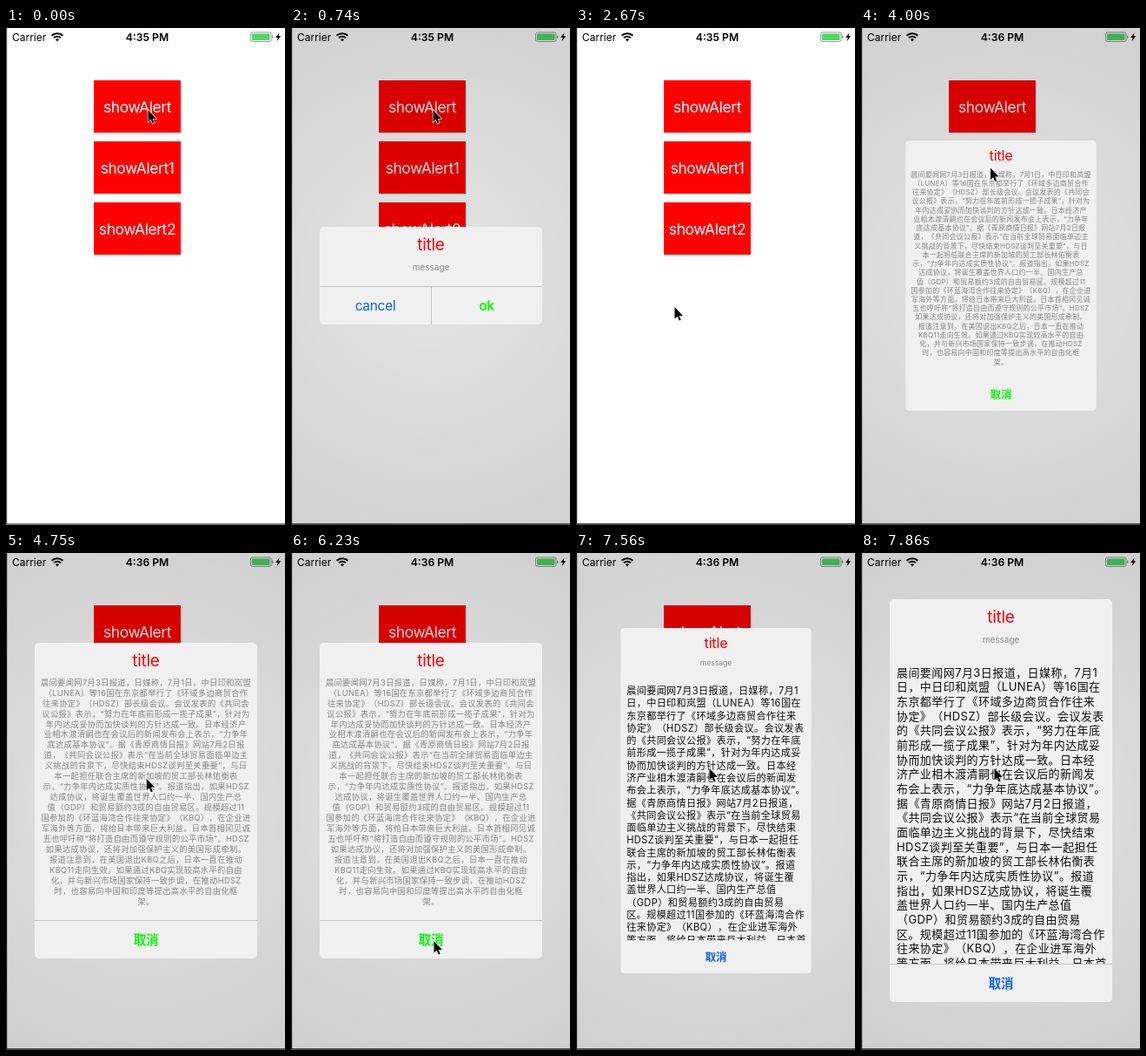
Animation of 321 by 570 pixels, one loop 8000 ms. Source, as an HTML page:

```html
<!DOCTYPE html>
<html lang="zh-CN">
<head>
<meta charset="utf-8">
<title>Alerts</title>
<style>
  html, body { margin: 0; width: 100%; height: 100%; overflow: hidden; background: #fff; }
  svg { display: block; width: 100%; height: 100%; }
  text { font-family: Inter, "Noto Sans CJK SC", "Noto Sans CJK", sans-serif; white-space: pre; }
  .mid { text-anchor: middle; }
  .btn { font-size: 17.5px; letter-spacing: -.025em; fill: #fff; }
  .title { font-size: 19px; letter-spacing: -.015em; fill: #f00; }
  .note { font-size: 10px; fill: #888; }
  .small, .large { letter-spacing: .033em; text-spacing-trim: space-all; font-feature-settings: "chws" 0; }
  .small { font-size: 9.3px; fill: #858585; }
  .large { font-size: 13px; fill: #111; }
  .act { font-size: 15.5px; letter-spacing: -.02em; }
  .zh { font-size: 14.5px; letter-spacing: -.02em; }
  .act, .zh { fill: #0a60ff; }
  .bold { font-weight: 600; }
  .ok { fill: #0f0; }
  .line { stroke: #c4c4c4; stroke-width: 1; }
</style>
</head>
<body>
<svg viewBox="0 0 321 570" preserveAspectRatio="none">
  <defs>
    <radialGradient id="shade" gradientUnits="userSpaceOnUse" cx="161" cy="284" r="320">
      <stop offset="0" stop-opacity=".11"/>
      <stop offset="1" stop-opacity=".188"/>
    </radialGradient>
    <clipPath id="scroll"><rect x="33" y="126" width="256" height="345"/></clipPath>
  </defs>
  <rect width="321" height="570" fill="#fff"/>
  <g id="buttons"></g>
  <g id="battery">
    <rect x="281.5" y="5" width="23.5" height="10.5" rx="2" fill="none" stroke="#999"/>
    <rect x="283" y="6.5" width="20.5" height="7.5" rx=".8" fill="#4cd964"/>
    <path d="M306 8.3q1.6 .3 1.6 2t-1.6 2z" fill="#999"/>
  </g>
  <rect id="dim" x="1" width="320" height="568" fill="url(#shade)"/>
  <g id="status">
    <text x="7" y="14.5" font-size="12">Carrier</text>
    <g fill="none" stroke="#000" stroke-width="2">
      <path d="M52.6 8.8a9 9 0 0 1 12.8 0"/>
      <path d="M55 11.4a5.6 5.6 0 0 1 8 0"/>
      <path d="M59 15.4l-2-2.2a2.9 2.9 0 0 1 4 0z" fill="#000" stroke="none"/>
    </g>
    <text id="clock" class="mid bold" x="162.5" y="14.5" font-size="12.2"></text>
    <path d="M314.6 5.2l-4.4 5.7h2.6l-1.2 4.3 4.6-5.9h-2.7z"/>
  </g>
  <g id="alerts"></g>
  <path id="frame" d="M.5 0V569H321" fill="none"/>
  <path id="cursor" d="M0 0V15L3.4 11.9 5.8 17.3 8 16.3 5.7 11H10.5Z" fill="#000" stroke="#fff" stroke-width="1.4" paint-order="stroke"/>
</svg>
<script>
const LOOP = 8000, STEP = 148, CX = 161, CY = 284;
const $ = id => document.getElementById(id);

// "/" breaks lines in the small layout, "|" in the large one
const story = '晨间要闻网7月3日报道，日媒称，7月1|日，中日印和岚盟/（LUNEA）等16国在|东京都举行了《环域多边商贸合作/往来|协定》（HDSZ）部长级会议。会议发表|的《共同会/议公报》表示，“努力在年底|前形成一揽子成果”，针对为/年内达成妥|协而加快谈判的方针达成一致。日本经|济产/业相木渡清嗣也在会议后的新闻发|布会上表示，“力争年/底达成基本协议”。|据《青原商情日报》网站7月2日报/道，|《共同会议公报》表示“在当前全球贸易|面临单边主/义挑战的背景下，尽快结束|HDSZ谈判至关重要”，与日/本一起担任|联合主席的新加坡的贸工部长林佑衡表|/示，“力争年内达成实质性协议”。报道|指出，如果HDSZ/达成协议，将诞生覆|盖世界人口约一半、国内生产总/值|（GDP）和贸易额约3成的自由贸易|区。规模超过11/国参加的《环蓝海湾合作|往来协定》（KBQ），在企业进/军海外|等方面，将给日本带来巨大利益。日本首|相冈见诚/五也呼吁称“将打造自由而遵守规则的公平市场”。HDSZ/如果达成协议，还将对加强保护主义的美国形成牵制。/报道注意到，在美国退出KBQ之后，日本一直在推动/KBQ11走向生效。如果通过KBQ实现较高水平的自由/化，并与新兴市场国家保持一致步调，在推动HDSZ/时，也容易向中国和印度等提出高水平的自由化框/架。';
const small = story.replace(/\|/g, '').split('/');
const large = story.replace(/\//g, '').split('|').slice(0, 21);

const text = (s, x, y, cls) => `<text x="${x}" y="${y}" class="${cls}">${s}</text>`;
const mid = (s, x, y, cls) => text(s, x, y, 'mid ' + cls);
const lines = (list, x, y, gap, cls) => list.map((s, i) => text(s, x, y + i * gap, cls)).join('');
const rule = d => `<path class="line" d="${d}"/>`;
const panel = (y, h, body) =>
  `<g><rect x="33" y="${y}" width="256" height="${h}" rx="5" fill="#f0f0f0"/>${mid('title', CX, y + 27, 'title')}${body}</g>`;

$('buttons').innerHTML = ['', 1, 2].map((n, i) =>
  `<rect x="101" y="${60 + i * 70}" width="100" height="60" fill="#f00"/>` +
  mid('showAlert' + n, 151, 96.5 + i * 70, 'btn')).join('');

$('alerts').innerHTML =
  panel(228, 112, mid('message', CX, 278, 'note') +
    rule('M33 296.5H289M161.5 296.5V340') +
    mid('cancel', 97, 323.5, 'act') + mid('ok', 225, 323.5, 'act bold ok')) +
  panel(103, 362, lines(small, CX, 151.7, 11.95, 'mid small') +
    rule('M33 421.5H289') + mid('取消', CX, 448.5, 'zh bold ok')) +
  panel(53, 462, mid('message', CX, 103, 'note') +
    `<g clip-path="url(#scroll)">${lines(large, 41, 141.8, 16.65, 'large')}</g>` +
    rule('M33 471.5H289') + mid('取消', CX, 498.5, 'zh bold'));
const panels = [...$('alerts').children];

// start and end step; opening values are [opacity, scale]
const shows = [
  { from: 3, to: 16, open: [[.35, .75], [.8, .92], [.95, 1]] },
  { from: 27, to: 45, open: [[.97, .857], [1, .985]] },
  { from: 51, to: 99, open: [[.97, .857], [1, .985]] }
];
const closing = [.6, .15];

// step, x, y of the pointer tip
const path = [
  [0, 163.5, 94], [5, 163.5, 94], [7, 116.5, 317], [8, 116.5, 317], [9, 116, 317],
  [12, 116, 317], [13, 113.5, 320], [18, 113.5, 320], [22, 139, 168], [23, 139, 168],
  [25, 149, 160.5], [27, 149, 160.5], [30, 161, 229], [31, 161, 229], [34, 163, 318],
  [35, 163, 318], [40, 168, 464], [42, 164.5, 445], [44, 164.5, 445], [47, 160, 320],
  [50, 153.5, 247], [60, 153.5, 247]
];

function pointer(n) {
  const i = path.findIndex(k => k[0] > n);
  const [a, ax, ay] = path[i - 1], [b, bx, by] = path[i];
  const p = (n - a) / (b - a);
  return [ax + (bx - ax) * p, ay + (by - ay) * p];
}

function pose(show, n) {
  if (n < show.from) return [0, 1];
  if (n >= show.to) return [closing[n - show.to] || 0, 1];
  return show.open[n - show.from] || [1, 1];
}

function draw(t) {
  const n = Math.floor(t / STEP);
  let dim = 0;
  shows.forEach((show, i) => {
    const [alpha, scale] = pose(show, n), g = panels[i];
    g.style.display = alpha ? '' : 'none';
    g.setAttribute('opacity', n < show.to ? Math.min(1, alpha + .1) : alpha);
    g.setAttribute('transform', `translate(${CX} ${CY}) scale(${scale}) translate(${-CX} ${-CY})`);
    g.querySelector('.line').style.display = scale < .95 ? 'none' : '';
    dim = Math.max(dim, alpha);
  });
  $('dim').setAttribute('opacity', dim);
  $('clock').textContent = n < 20 ? '4:35 PM' : '4:36 PM';
  $('frame').setAttribute('stroke', n < 2 ? '#505050' : '#151515');
  $('frame').setAttribute('stroke-width', 1.4);
  $('cursor').setAttribute('transform', `translate(${pointer(n)}) scale(.9)`);
}

const start = performance.now();
function tick() {
  draw((performance.now() - start) % LOOP);
  requestAnimationFrame(tick);
}
tick();
</script>
</body>
</html>
```
